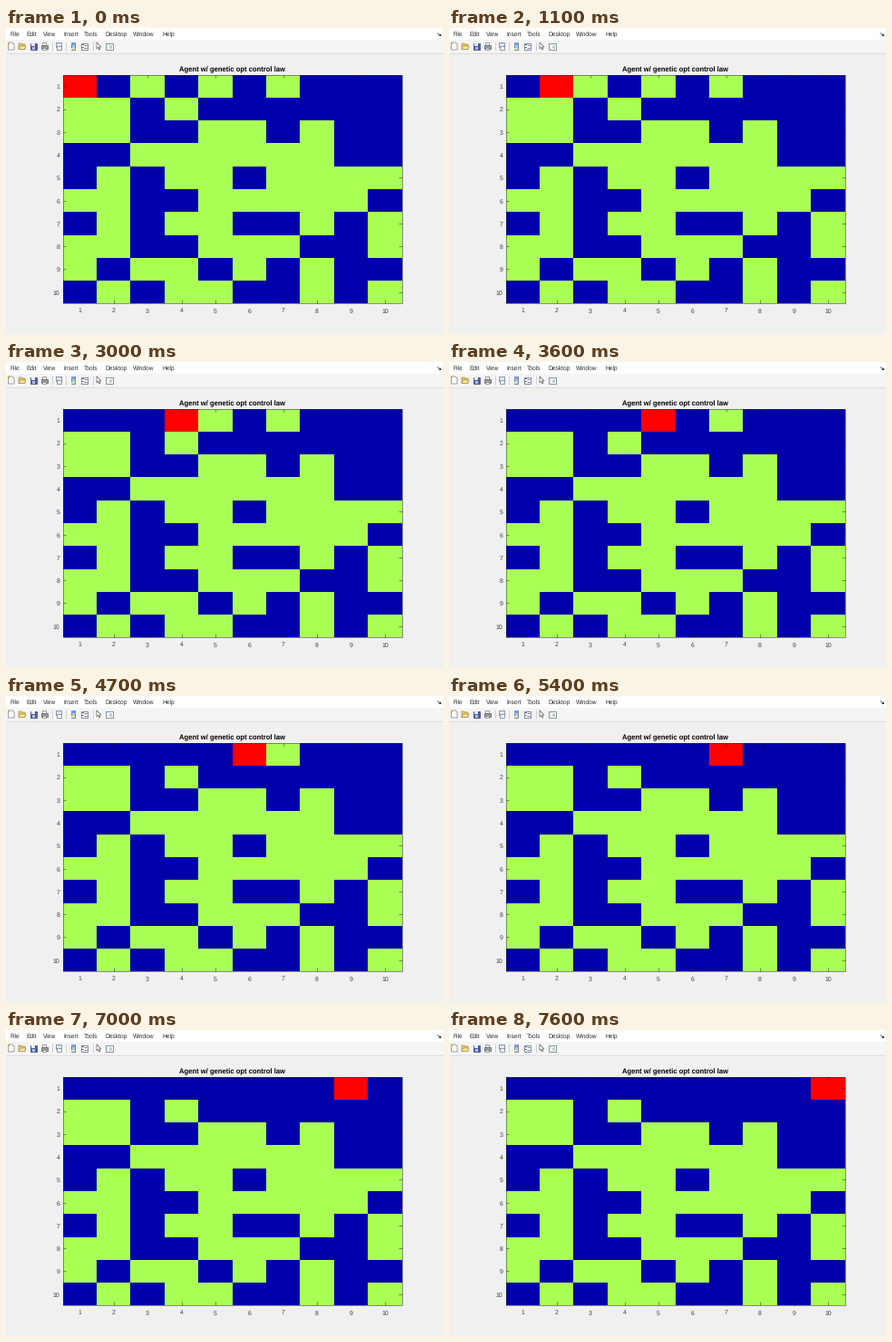
Write a matplotlib script that moves like this. It is 482 by 338 pixels and loops after 8000 ms.

```python
import matplotlib.pyplot as plt
import numpy as np
from matplotlib.animation import FuncAnimation
from matplotlib.colors import ListedColormap
from matplotlib.patches import Polygon, Rectangle

W, H, DPI = 482, 338, 64
PX = 72 / DPI  # points per pixel
STEP = 100     # ms
FRAMES = 80

LEFT, RIGHT, TOP, BOTTOM = 62.6, 436.6, 51.65, 304.35
N = 10
INK = "#262626"

DIRT = ["0010101000", "1101000000", "1100110100", "0011111100",
        "0101101111", "1100111110", "0101100101", "1100111001",
        "1011010100", "0101100101"]
grid = np.array([[int(c) for c in row] for row in DIRT])
MOVES = [1100, 1700, 2800, 3500, 4600, 5300, 6300, 6900, 7200]

plt.rcParams["font.family"] = "Liberation Sans"
plt.rcParams["text.hinting"] = "none"
fig = plt.figure(figsize=(W / DPI, H / DPI), dpi=DPI, facecolor="#f0f0f0")
ax = fig.add_axes([0, 0, 1, 1])


def rect(x, y, w, h, fill, edge=None, lw=0.7):
    ax.add_patch(Rectangle((x, y), w, h, fc=fill, ec=edge or "none",
                           lw=lw * PX if edge else 0, zorder=2))


def poly(points, fill, edge=None, lw=0.6):
    ax.add_patch(Polygon(points, closed=True, fc=fill, ec=edge or "none",
                         lw=lw * PX if edge else 0, zorder=2))


def line(x0, y0, x1, y1, color=INK, lw=0.6):
    ax.plot([x0, x1], [y0, y1], color=color, lw=lw * PX, zorder=4,
            solid_capstyle="butt")


def label(x, y, s, size, **kw):
    ax.text(x, y, s, fontsize=size * PX, **kw)


def draw_menu():
    rect(0, 0, W, 13, "#ffffff")
    rect(0, 13, W, 14, "#f5f5f5")
    line(0, 27.5, W, 27.5, "#dedede", 1)
    names = ["File", "Edit", "View", "Insert", "Tools", "Desktop", "Window", "Help"]
    for x, name in zip([4, 22, 41, 63, 86, 109.5, 140, 172], names):
        label(x, 9, name, 6.6, color="#2a2a2a")
    line(476, 5.5, 479, 8.3, "#333333", 0.8)
    poly([(480, 9), (477, 8.8), (479.7, 6.2)], "#333333")


def draw_toolbar():
    # new, open, save, print
    poly([(2.5, 16), (7, 16), (9, 18), (9, 24), (2.5, 24)], "#ffffff", "#666666")
    rect(1.5, 15.5, 2.5, 2.5, "#f0a030")
    poly([(14, 17), (17, 17), (18, 18), (21, 18), (21, 23.5), (14, 23.5)],
         "#e8c860", "#9a8040")
    poly([(15.5, 20), (22, 20), (20.5, 23.5), (14, 23.5)], "#ffe9a0", "#9a8040")
    rect(26.5, 16.5, 7, 7, "#4c5ca8", "#34407c")
    rect(28, 16.5, 4, 3, "#e6eaf6")
    rect(28.5, 21, 3, 2.5, "#b8bfd8")
    rect(40, 16, 4, 3, "#ffffff", "#777777")
    rect(38.5, 19, 7, 3.5, "#9c9ca4", "#5c5c62")
    rect(40, 21.5, 4, 2.5, "#ffffff", "#777777")
    # page preview
    rect(54.5, 16, 6, 5, "#dfe8f4", "#65758c")
    rect(56, 19.5, 5, 4.5, "#ffffff", "#65758c")
    # colour bar and legend
    rect(72, 16, 4, 8, "#a8cfe0", "#4a6080")
    rect(72.4, 16.4, 3.2, 2.2, "#7f9cd8")
    rect(72.4, 21.6, 3.2, 2, "#ece2a8")
    rect(82.5, 16.5, 7, 7, "#ffffff", "#4a6080")
    for y, color in [(18.5, "#b06070"), (21.5, "#5c78c8")]:
        rect(83.5, y - 0.6, 2, 1.4, color)
        line(86.3, y, 88.8, y, "#555555", 0.8)
    # pointer and panel
    poly([(100, 15.8), (100, 22.8), (101.6, 21.4), (102.8, 24), (103.8, 23.5),
          (102.7, 21), (104.8, 21)], "#ffffff", "#444444")
    rect(110, 16.5, 7.5, 7, "#ffffff", "#666666")
    rect(110.3, 16.8, 7, 1.5, "#7a9aa6")
    rect(114.3, 18.5, 2.9, 4.7, "#b9d3dc")
    for x in (50.5, 65.5, 95.5):
        line(x, 15, x, 25, "#c8c8c8", 0.8)


def draw_axes():
    label((LEFT + RIGHT) / 2, 48, "Agent w/ genetic opt control law", 7.63,
          weight="bold", ha="center", color="#000000")
    cw, ch, tick = (RIGHT - LEFT) / N, (BOTTOM - TOP) / N, 3.6
    x0, x1, y0, y1 = 62.5, 436.5, 51.5, 303.5
    for i in range(N):
        x, y = LEFT + (i + 0.5) * cw, TOP + (i + 0.5) * ch
        label(x, 314.5, str(i + 1), 6.9, ha="center", color="#404040")
        label(59.3, y + 2.9, str(i + 1), 6.9, ha="right", color="#404040")
        line(x, y1, x, y1 - tick, lw=0.5)
        line(x, y0, x, y0 + tick, lw=0.5)
        line(x0, y, x0 + tick, y, lw=0.5)
        line(x1, y, x1 - tick, y, lw=0.5)
    for y in (y0, y1):
        line(x0, y, x1, y, lw=0.5)
    for x in (x0, x1):
        line(x, y0, x, y1, lw=0.5)


def world(t):
    """Dirt map at time t: visited cells are clean, the agent is 2."""
    pos = sum(t >= m for m in MOVES)
    cells = grid.copy()
    cells[0, :pos] = 0
    cells[0, pos] = 2
    return cells


draw_menu()
draw_toolbar()
draw_axes()
# Cell borders sit on whole pixels.
cols = np.round(np.linspace(LEFT, RIGHT, N + 1))
rows = np.round(np.linspace(TOP, BOTTOM, N + 1))
board = ax.pcolormesh(cols, rows, world(0), vmin=0, vmax=2, zorder=1,
                      cmap=ListedColormap(["#0000aa", "#aaff55", "#ff0000"]))
ax.set_xlim(0, W)
ax.set_ylim(H, 0)
ax.axis("off")


def update(i):
    board.set_array(world(i * STEP))
    return [board]


anim = FuncAnimation(fig, update, frames=FRAMES, interval=STEP, repeat=True,
                     repeat_delay=0, blit=False)
plt.show()
```
